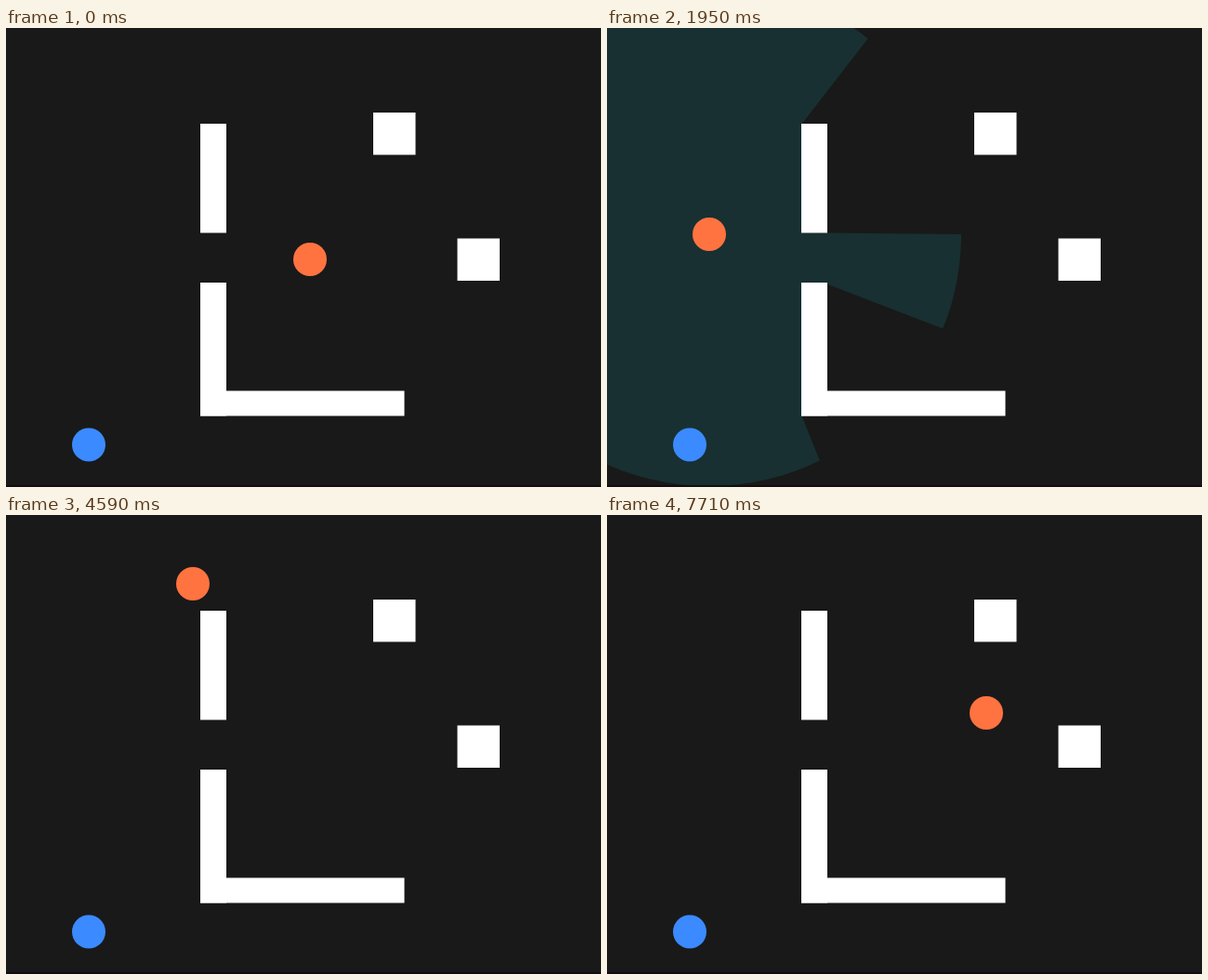
An HTML page with a canvas for the animation above (7.74 s loop, 640 by 494 pixels).

```html
<!DOCTYPE html>
<html lang="en">
<head>
<meta charset="utf-8">
<title>Dash range</title>
<style>
  html, body { margin: 0; width: 100%; height: 100%; overflow: hidden; background: #191919; }
  canvas { display: block; }
</style>
</head>
<body>
<canvas id="stage" width="640" height="494"></canvas>
<script>
const ctx = document.getElementById('stage').getContext('2d');
const LOOP = 7740, RANGE = 271, SPEED = 0.5, WAVE_TIME = 240, WAVE_RADIUS = 76;

// x, y, width, height
const walls = [
  [209, 103, 28, 117.5],
  [209, 274, 28, 143.5],
  [209, 390.5, 219.5, 27],
  [395, 91, 45.5, 45.5],
  [485.5, 226.5, 45.5, 45.5]
];

const stops = [[327, 249], [110, 222], [201, 74], [408, 213]];

// aim: range shown; dash: range hidden and the player leaves
const legs = [
  { aim: 300, dash: 809 },
  { aim: 1800, dash: 3448 },
  { aim: 4830, dash: 6013 }
].map((leg, i) => {
  const [from, to] = [stops[i], stops[i + 1]];
  const length = Math.hypot(to[0] - from[0], to[1] - from[1]);
  return { ...leg, from, to, land: leg.dash + length / SPEED, fan: castFan(from) };
});

// Distance along a ray to a box, or Infinity on a miss
function hitBox([ox, oy], dx, dy, [x, y, w, h]) {
  const xs = [(x - ox) / dx, (x + w - ox) / dx];
  const ys = [(y - oy) / dy, (y + h - oy) / dy];
  const near = Math.max(Math.min(...xs), Math.min(...ys));
  const far = Math.min(Math.max(...xs), Math.max(...ys));
  return near <= far && near >= 0 ? near : Infinity;
}

// One ray per degree, joined into an outline
function castFan(origin) {
  const path = new Path2D();
  for (let deg = 0; deg < 360; deg++) {
    const a = deg * Math.PI / 180;
    const dx = Math.cos(a), dy = Math.sin(a);
    const reach = Math.min(RANGE, ...walls.map(w => hitBox(origin, dx, dy, w)));
    path.lineTo(origin[0] + dx * reach, origin[1] + dy * reach);
  }
  path.closePath();
  return path;
}

const clamp = v => Math.max(0, Math.min(1, v));

function disc([x, y], radius, color) {
  ctx.fillStyle = color;
  ctx.beginPath();
  ctx.arc(x, y, radius, 0, Math.PI * 2);
  ctx.fill();
}

function drawWave(center, p) {
  ctx.globalAlpha = 0.7 * (1 - p);
  ctx.strokeStyle = '#ff7340';
  ctx.lineWidth = 3;
  ctx.beginPath();
  ctx.arc(center[0], center[1], 18 + (WAVE_RADIUS - 18) * p, 0, Math.PI * 2);
  ctx.stroke();
  ctx.globalAlpha = 1;
}

function draw(t) {
  ctx.fillStyle = '#191919';
  ctx.fillRect(0, 0, 640, 494);

  let player = stops[0];
  for (const { aim, dash, land, from, to, fan } of legs) {
    if (t >= aim && t < dash) {
      ctx.globalAlpha = clamp((t - aim) / 120);
      ctx.fillStyle = '#183031';
      ctx.fill(fan);
      ctx.globalAlpha = 1;
    }
    if (t >= land && t < land + WAVE_TIME) drawWave(to, (t - land) / WAVE_TIME);
    if (t >= dash) {
      const p = clamp((t - dash) / (land - dash));
      player = from.map((v, i) => v + (to[i] - v) * p);
    }
  }

  ctx.fillStyle = '#fff';
  walls.forEach(w => ctx.fillRect(...w));
  disc([89, 448.5], 18, '#3b8aff');
  disc(player, 18, '#ff7340');

  ctx.fillStyle = '#120e10';
  ctx.fillRect(0, 492, 640, 2);
}

const start = performance.now();
function tick() {
  draw((performance.now() - start) % LOOP);
  requestAnimationFrame(tick);
}
tick();
</script>
</body>
</html>
```
